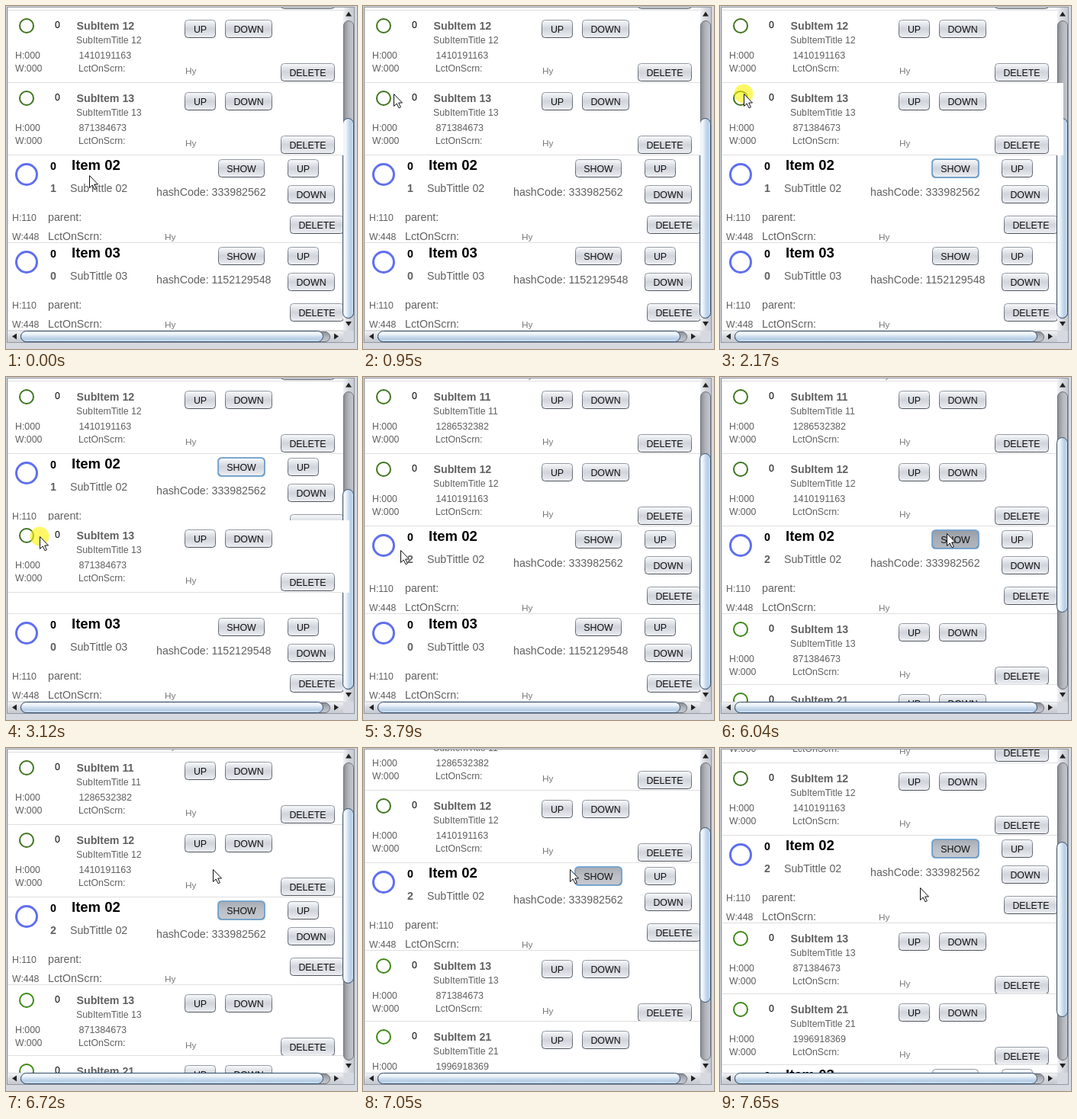
Write an HTML page that moves like this. It is 460 by 450 pixels and loops after 8 s.

```html
<!DOCTYPE html>
<html lang="en">
<head>
<meta charset="utf-8">
<title>Item list</title>
<style>
html, body { margin: 0; width: 100%; height: 100%; overflow: hidden; background: #d6d9df; }
svg { display: block; width: 460px; height: 450px; font-family: "Liberation Sans", Arial, sans-serif; }
text { fill: #606060; white-space: pre; }
.s { font-size: 12.3px; }
.n { font-size: 12.5px; }
.m { font-size: 14.2px; }
.b { font-weight: bold; }
.k { fill: #000; }
.big { font-size: 18.5px; }
.hy { font-size: 11.8px; fill: #777; }
.line { fill: #dfdfdf; }
.btn rect { fill: url(#face); stroke: url(#edge); }
.btn text { font-size: 12.4px; fill: #111; text-anchor: middle; }
.btn .ring { fill: none; stroke: #73a4d1; stroke-width: 2; opacity: .9; }
.hover .face { fill: url(#light); }
.down .face { fill: url(#dark); }
.on .face { fill: url(#mid); }

/* 8 s loop, 1% = 80 ms */
.anim { animation: 8s step-end infinite; }
.focus { animation-name: focus; }
.wide { animation-name: wide; }
.drag { animation-name: drag; }
.swap { animation-name: swap; }
.dropped { animation-name: dropped; }
.hover { animation-name: hover; }
.down { animation-name: down; }
.on { animation-name: on; }
.kids { animation-name: kids; }
.push { animation-name: push; }
.scroll { animation-name: scroll; }
.size { animation-name: size; }
.spot { animation-name: spot; }
.cursor { animation-name: cursor; }

@keyframes focus { 0% { opacity: 0 } 21.875% { opacity: 1 } }
@keyframes wide { 0% { opacity: 0 } 22.75% { opacity: 1 } }
@keyframes dropped { 0% { opacity: 0 } 47.375% { opacity: 1 } }
@keyframes hover { 0% { opacity: 0 } 64.25% { opacity: 1 } 69.25% { opacity: 0 } }
@keyframes down { 0% { opacity: 0 } 69.25% { opacity: 1 } 83% { opacity: 0 } }
@keyframes on { 0% { opacity: 0 } 83% { opacity: 1 } }
@keyframes kids { 0% { opacity: 0 } 71% { opacity: 1 } }
@keyframes push { 0% { transform: none } 71% { transform: translateY(186px) } }
@keyframes swap { 0% { transform: translateY(196px) } 33% { transform: translateY(101px) } }
@keyframes spot { 0% { opacity: 0 } 21.875% { opacity: .35 } 22.75% { opacity: .6 } 47.375% { opacity: 0 } }
@keyframes drag {
  0%, 32.125% { transform: translateY(101px); opacity: 1; animation-timing-function: steps(2, jump-both) }
  33.875%, 36.375% { transform: translateY(132px); opacity: 1; animation-timing-function: steps(3, jump-both) }
  39%, 39.875% { transform: translateY(188px); opacity: 1; animation-timing-function: steps(1, jump-both) }
  40.75% { transform: translateY(213px); opacity: 1 }
  47.375%, 100% { transform: translateY(213px); opacity: 0 }
}
@keyframes scroll {
  0%, 84.875% { transform: translateY(0); animation-timing-function: steps(4, jump-both) }
  88.125%, 90.625% { transform: translateY(-45px); animation-timing-function: steps(1, jump-both) }
  91.5%, 94.75% { transform: translateY(-63px); animation-timing-function: steps(1, jump-both) }
  95.625%, 100% { transform: translateY(-81px) }
}
@keyframes size {
  0% { y: 147.5px; height: 262px }
  47.375% { y: 100.5px; height: 309px }
  71%, 84.875% { y: 79.5px; height: 229px; animation-timing-function: steps(4, jump-both) }
  88.125%, 90.625% { y: 104.5px; height: 229px; animation-timing-function: steps(1, jump-both) }
  91.5%, 94.75% { y: 114.5px; height: 229px; animation-timing-function: steps(1, jump-both) }
  95.625%, 100% { y: 123.5px; height: 229px }
}
@keyframes cursor {
  0%, 6.625% { transform: translate(109px, 222px); animation-timing-function: steps(6, jump-both) }
  11.875%, 16.875% { transform: translate(40px, 115px); animation-timing-function: steps(1, jump-both) }
  18.5%, 32.125% { transform: translate(31px, 115px); animation-timing-function: steps(2, jump-both) }
  33.875%, 36.375% { transform: translate(36px, 145px); animation-timing-function: steps(3, jump-both) }
  39%, 39.875% { transform: translate(44px, 209px); animation-timing-function: steps(1, jump-both) }
  40.75%, 56.5% { transform: translate(49px, 227px); animation-timing-function: steps(4, jump-both) }
  60%, 63.375% { transform: translate(291px, 227px); animation-timing-function: steps(2, jump-both) }
  65.125%, 80.5% { transform: translate(297px, 205px); animation-timing-function: steps(4, jump-both) }
  84%, 90.625% { transform: translate(271px, 159px); animation-timing-function: steps(1, jump-both) }
  91.5%, 94.75% { transform: translate(267px, 171px); animation-timing-function: steps(1, jump-both) }
  95.625%, 100% { transform: translate(262px, 183px) }
}
</style>
</head>
<body>
<svg id="stage" viewBox="0 0 460 450"></svg>
<script>
const text = (x, y, str, cls) => `<text x="${x}" y="${y}" class="${cls}">${str}</text>`;
const at = (y, body) => `<g transform="translate(0 ${y})">${body}</g>`;
const anim = (name, body) => `<g class="anim ${name}">${body}</g>`;
const box = (x, y, w, h, attrs) => `<rect x="${x}" y="${y}" width="${w}" height="${h}" ${attrs}/>`;

function grad(id, colors, across) {
  const stops = colors.map((c, i) => `<stop offset="${i / (colors.length - 1)}" stop-color="${c}"/>`);
  return `<linearGradient id="${id}" x2="${across ? 1 : 0}" y2="${across ? 0 : 1}">${stops.join('')}</linearGradient>`;
}

function button(x, y, w, label, state = '', ring = false) {
  return `<g class="btn ${state}">` +
    box(x + .5, y + .5, w - 1, 23, 'rx="4" class="face"') +
    (ring ? box(x, y, w, 24, 'rx="4.5" class="ring"') : '') +
    `<text x="${x + w / 2}" y="${y + 17}">${label}</text></g>`;
}

const show = (state, ring) => button(278, 5, 61, 'SHOW', state && 'anim ' + state, ring);

function subItem(num, code, h = 95, color = '#40751f') {
  return box(3, 0, 439, h, 'fill="#fff"') +
    `<circle cx="27" cy="20" r="9" fill="none" stroke="${color}" stroke-width="2"/>` +
    text(64, 23, '0', 's k') +
    text(92.5, 25, 'SubItem ' + num, 'm b') +
    text(92, 43, 'SubItemTitle ' + num, 's') +
    text(12, 63, 'H:000', 's') + text(12, 80, 'W:000', 's') +
    text(95.5, 63, code, 'n') + text(95, 80, 'LctOnScrn:', 's') +
    text(235, 83, 'Hy', 'hy') +
    button(234, 12, 41, 'UP') + button(287, 12, 62, 'DOWN') + button(360, 69, 71, 'DELETE') +
    box(3, h - 1, 439, 1, 'class="line"');
}

function item(num, count, code, states = '') {
  return box(3, 0, 439, 115, 'fill="#fff"') +
    '<circle cx="27" cy="25" r="13.5" fill="none" stroke="#606ff0" stroke-width="3"/>' +
    text(58, 19, '0', 'm b k') + text(58, 48, count, 'm b') +
    text(86, 19, 'Item ' + num, 'big b k') +
    text(84, 48, 'SubTittle ' + num, 'm') +
    text(197, 53, 'hashCode: ' + code, 'm') +
    text(8, 86, 'H:110', 's') + text(55, 86, 'parent:', 'm') +
    text(8, 111, 'W:448', 's') + text(55, 111, 'LctOnScrn:', 'm') +
    text(208, 111, 'Hy', 'hy') +
    show('') + states +
    button(369, 5, 41, 'UP') + button(369, 39, 62, 'DOWN') + button(372, 79, 71, 'DELETE') +
    box(3, 114, 439, 1, 'class="line"');
}

const white = box(3, 2, 439, 424, 'fill="#fff"');
const sub11 = subItem(11, '1286532382');
const sub12 = subItem(12, '1410191163');
const item03 = item('03', 0, '1152129548');
const hash02 = '333982562';
const green = '#3c8a14';

const before = white + at(-89, sub11) + at(6, sub12) +
  anim('swap', item('02', 1, hash02, show('focus', true))) +
  at(311, item03) + box(3, 310, 439, 1, 'class="line"');

const after = anim('dropped', white + anim('scroll',
  at(-109, item('01', 3, '0')) + at(6, sub11) + at(101, sub12) +
  at(196, item('02', 2, hash02, show('hover') + show('down', true) + show('on', true))) +
  anim('push', at(311, item03)) +
  anim('kids', at(311, subItem(13, '871384673', 93, green)) +
    at(404, subItem(21, '1996918369', 93, green)))));

const arrow = d => `<path d="${d}" fill="#222"/>`;

const bars =
  box(442, 2, 14, 424, 'fill="url(#barV)"') +
  box(442.5, 19.5, 13, 390, 'rx="6.5" fill="url(#trackV)" stroke="#6d7178"') +
  '<rect class="anim size" x="441.5" width="14" rx="7" fill="url(#thumbV)" stroke="#354e6c"/>' +
  arrow('M445 13.500h8l-4-6z') + arrow('M445 414h8l-4 6z') +
  box(2, 427, 440, 14, 'fill="url(#barH)"') +
  box(19.5, 427.500, 405, 13, 'rx="6.5" fill="url(#trackH)" stroke="#6d7178"') +
  box(19.5, 426.500, 396, 14, 'rx="7" fill="url(#thumbH)" stroke="#354e6c"') +
  arrow('M14 429.500v8l-6-4z') + arrow('M430 429.500v8l6-4z');

const thumb = ['#e9f1f9', '#f3f8fc', '#cfdff0', '#b5cde5', '#d3e6f8'];
const track = ['#898d94', '#b2b5bb', '#c6c9ce'];
const bar = ['#f1f2f4', '#d5d8de', '#c5c9d0'];

document.getElementById('stage').innerHTML = '<defs>' +
  grad('face', ['#fafbfc', '#e3e6eb', '#d0d4db', '#dde0e6', '#eef0f3']) +
  grad('light', ['#ffffff', '#f3f4f7', '#e6e8ed', '#f7f8fa']) +
  grad('dark', ['#989ca4', '#a9adb5', '#b1b5bd']) +
  grad('mid', ['#a9adb4', '#bbbfc6', '#c5c9cf']) +
  grad('edge', ['#949aa4', '#50555e']) +
  grad('thumbV', thumb, true) + grad('thumbH', thumb) +
  grad('trackV', track, true) + grad('trackH', track) +
  grad('barV', bar, true) + grad('barH', bar) +
  `<clipPath id="view">${box(3, 2, 439, 424, '')}</clipPath></defs>` +
  box(0, 0, 460, 450, 'fill="#d6d9df"') +
  box(1.5, 1.5, 455, 440, 'fill="#d6d9df" stroke="#9297a1"') +
  `<g clip-path="url(#view)">${before}${after}</g>` + bars +
  anim('drag', box(442, 0, 8, 95, 'class="anim wide" fill="#fff"') + subItem(13, '871384673')) +
  anim('cursor', '<circle class="anim spot" r="12.5" fill="#fff200"/>' +
    '<path d="M.5.5V16.500L4.200 13 7 18.800 9.400 17.700 6.700 12H11.500Z" fill="#fff" stroke="#111"/>');
</script>
</body>
</html>
```
